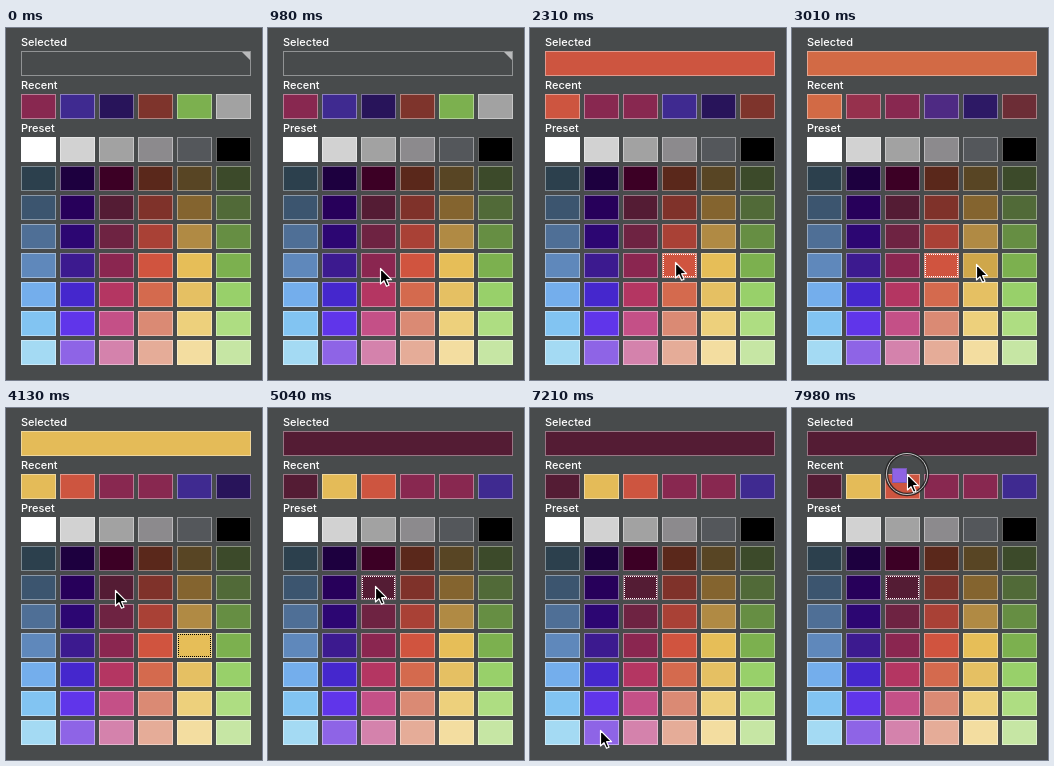
These frames come from a looping animation (256 px wide and 352 px high, 8000 ms). An HTML page:

```html
<!DOCTYPE html>
<html lang="en">
<head>
<meta charset="utf-8">
<title>Colour palette</title>
<style>
html, body { margin: 0; width: 100%; height: 100%; overflow: hidden; background: #484b4c; }
#stage { position: relative; width: 256px; height: 352px; overflow: hidden; }
#stage > * { position: absolute; box-sizing: border-box; }
.label { left: 15px; font: 500 11px/14px Inter, Roboto, sans-serif; color: #fff; white-space: nowrap; }
.cell { width: 35px; height: 25px; border: 1px solid rgba(255, 255, 255, .4); }
.cell.wide { width: 230px; }
.live { animation: history 8s linear infinite; }
.corner { left: 236px; top: 24px; width: 8px; height: 8px; background: #b9babb;
  clip-path: polygon(0 0, 100% 0, 100% 100%); animation: corner 8s linear infinite; }
.press { left: 0; top: 0; width: 35px; height: 25px; background: #5a2c00; animation: press 8s step-end infinite; }
svg { left: 0; top: 0; }
.focus { fill: none; stroke-width: 1; stroke-dasharray: 1 1; stroke-dashoffset: .5; animation: focus 8s step-end infinite; }
.pointer { animation: move 8s ease-in-out infinite; }
.ring { animation: ring 8s step-end infinite; }
.chip { animation: chip 8s step-end infinite; }

@keyframes history {
  0%, 13.5% { background: var(--s0); }
  15.4%, 24.75% { background: var(--s1); }
  26.6%, 37.25% { background: var(--s2); }
  39.1%, 57.5% { background: var(--s3); }
  59.4%, 100% { background: var(--s4); }
}
@keyframes corner {
  0%, 13.5% { opacity: 1; }
  15.4%, 100% { opacity: 0; }
}
@keyframes focus {
  0% { opacity: 0; stroke: #fff; transform: translate(93px, 225px); }
  14.4% { opacity: 1; stroke: #fff; transform: translate(93px, 225px); }
  25.7% { opacity: 1; stroke: #fff; transform: translate(132px, 225px); }
  38.5% { opacity: 1; stroke: #000; transform: translate(171px, 225px); }
  58.4%, 100% { opacity: 1; stroke: #fff; transform: translate(93px, 167px); }
}
@keyframes press {
  0% { opacity: 0; transform: translate(93px, 225px); }
  12.6% { opacity: .16; transform: translate(93px, 225px); }
  14.4% { opacity: 0; transform: translate(132px, 225px); }
  23.9% { opacity: .16; transform: translate(132px, 225px); }
  25.7% { opacity: 0; transform: translate(171px, 225px); }
  36.7% { opacity: .16; transform: translate(171px, 225px); }
  38.5% { opacity: 0; transform: translate(93px, 167px); }
  56.6% { opacity: .16; transform: translate(93px, 167px); }
  58.4%, 100% { opacity: 0; transform: translate(93px, 167px); }
}
@keyframes move {
  0%, 2.5% { transform: translate(150px, 356px); }
  10.6%, 15.6% { transform: translate(112px, 240px); }
  21%, 28.1% { transform: translate(144px, 234px); }
  35%, 42.5% { transform: translate(184px, 236px); }
  51.25% { transform: translate(109px, 182px); }
  55.6%, 67.5% { transform: translate(107px, 178px); }
  82.5%, 90.2% { transform: translate(70px, 322px); }
  92.5% { transform: translate(70px, 325px); }
  99.5%, 100% { transform: translate(115px, 66px); }
}
@keyframes ring {
  0% { opacity: 0; }
  91.8%, 100% { opacity: 1; }
}
@keyframes chip {
  0% { opacity: 0; }
  93.6%, 100% { opacity: 1; }
}
</style>
</head>
<body>
<div id="stage">
  <div class="label" style="top:7px">Selected</div>
  <div class="label" style="top:50px">Recent</div>
  <div class="label" style="top:93px">Preset</div>
</div>
<script>
const stage = document.getElementById('stage');
const presets = [
  '#fff #d2d2d2 #a2a2a2 #8c8a8d #54575b #000',
  '#2c404d #1d003f #3c0025 #5a281b #584524 #3c4a2a',
  '#3c556f #27005a #541c34 #7f322a #84642f #516a38',
  '#4f6f96 #2c0672 #6e2342 #a94136 #b08a44 #668e43',
  '#5f88bb #3c1a8f #8a2650 #d0543f #e6be58 #7cb04f',
  '#74aeec #4527cd #b43662 #d46a4e #e5c063 #98d06a',
  '#82c4f2 #6035ea #c45087 #da8a74 #edd07c #aedd82',
  '#a4daf3 #8e64e6 #d482ac #e5ac98 #f3dda0 #c6e6a4'
].map(row => row.split(' '));

// Newest pick first; each click shifts the recent row along this list.
const picks = '#541c34 #e4bb58 #cd5540 #882850 #882850 #3f2a90 #28145a #7e342c #7cb04f #a2a2a2'.split(' ');
const CLICKS = 4;

function add(className) {
  const el = document.createElement('div');
  el.className = className;
  stage.append(el);
  return el;
}

function cell(x, y, className = 'cell') {
  const el = add(className);
  el.style.left = x + 'px';
  el.style.top = y + 'px';
  return el;
}

function setHistory(el, slot, first) {
  for (let s = 0; s <= CLICKS; s++) {
    el.style.setProperty('--s' + s, s === 0 && first || picks[CLICKS - s + slot]);
  }
}

setHistory(cell(15, 23, 'cell wide live'), 0, '#484b4c');
add('corner');
for (let c = 0; c < 6; c++) setHistory(cell(15 + 39 * c, 66, 'cell live'), c);
presets.forEach((row, r) => row.forEach((color, c) => {
  cell(15 + 39 * c, 109 + 29 * r).style.background = color;
}));
add('press');

stage.insertAdjacentHTML('beforeend', `
<svg width="256" height="352" viewBox="0 0 256 352">
  <rect class="focus" x="1.5" y="1.5" width="32" height="22"/>
  <g class="pointer">
    <rect class="chip" x="-14.5" y="-5.5" width="14" height="14" fill="#8f63e4" stroke="#775bb4"/>
    <g class="ring" fill="none">
      <circle r="20.5" stroke="#222" stroke-opacity=".85" stroke-width="3.6"/>
      <circle r="20.5" stroke="#c4c5c6" stroke-width="1"/>
    </g>
    <path d="M.5 .5V16L4 12.7L6.5 18.3L9 17.2L6.6 11.7H11.5Z" fill="#000" stroke="#fff" stroke-width="1.2" stroke-linejoin="round"/>
  </g>
</svg>`);
</script>
</body>
</html>
```
